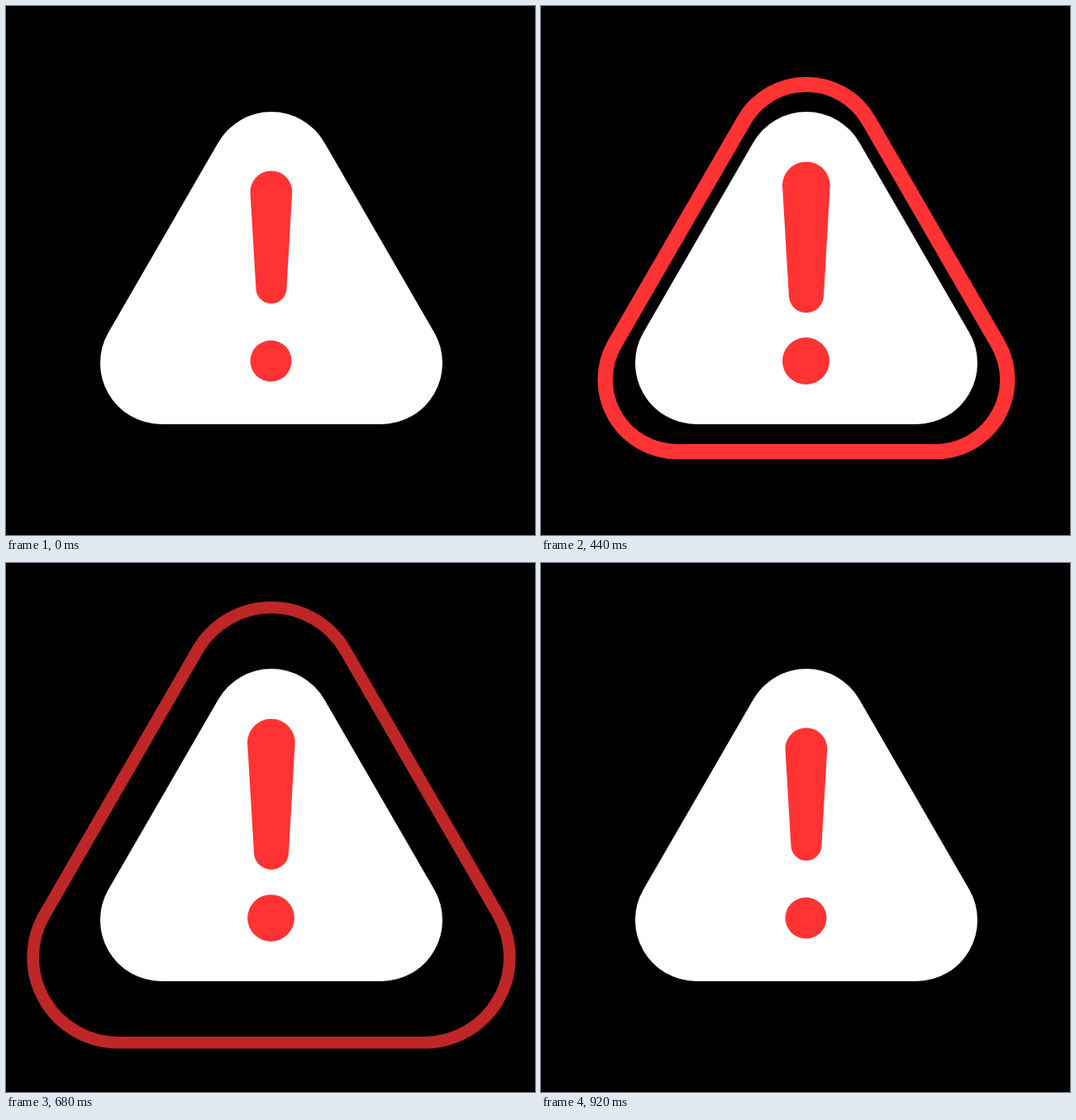
Write an HTML page that moves like this. It is 640 by 640 pixels and loops after 960 ms.

```html
<!DOCTYPE html>
<html lang="en">
<head>
<meta charset="utf-8">
<title>Warning pulse</title>
<style>
  html, body { margin: 0; width: 100%; height: 100%; overflow: hidden; background: #000; }
  svg { display: block; width: 100%; height: 100%; }
</style>
</head>
<body>
<svg viewBox="0 0 640 640">
  <defs>
    <path id="sign" d="M256.9 165A74 74 0 0 1 385.1 165L518.1 395A74 74 0 0 1 454 506H188A74 74 0 0 1 123.9 395Z"/>
  </defs>
  <use id="ring" href="#sign" fill="none" stroke="#f33"/>
  <use href="#sign" fill="#fff"/>
  <g fill="#f33">
    <path id="bar" d="M295.6 227A25.35 25.35 0 1 1 346.1 227L339.5 341.5A18.5 18.5 0 0 1 302.4 341.5Z"/>
    <circle id="dot" cx="320.5" cy="429.5" r="25"/>
  </g>
</svg>
<script>
const LOOP = 960, STEP = 40, END = 920, PEAK = 560;
const [ring, bar, dot] = ['ring', 'bar', 'dot'].map(id => document.getElementById(id));

// Sine ease from 0 at time a to 1 at time b
const ease = (t, a, b) => {
  const p = Math.min(1, Math.max(0, (t - a) / (b - a)));
  return (1 - Math.cos(Math.PI * p)) / 2;
};

const zoom = (el, x, y, k) =>
  el.setAttribute('transform', `translate(${x} ${y}) scale(${k}) translate(${-x} ${-y})`);

function draw(t) {
  const grow = ease(t, -165, 1005);
  const fade = 1 - ease(t, PEAK, END);
  const k = (326 + 305 * grow) / 414;
  zoom(ring, 321, 317, k);
  ring.setAttribute('stroke-width', (24.9 - 12.5 * grow) / k);
  ring.setAttribute('opacity', t < 160 ? 0 : fade);

  const pulse = 1 + 0.18 * (t < PEAK ? ease(t, 190, PEAK) : fade);
  zoom(bar, 320.8, 279.7, pulse);
  zoom(dot, 320.5, 429.5, pulse);
}

const start = performance.now();
function tick() {
  const t = (performance.now() - start) % LOOP;
  draw(Math.floor(t / STEP) * STEP);
  requestAnimationFrame(tick);
}
tick();
</script>
</body>
</html>
```
